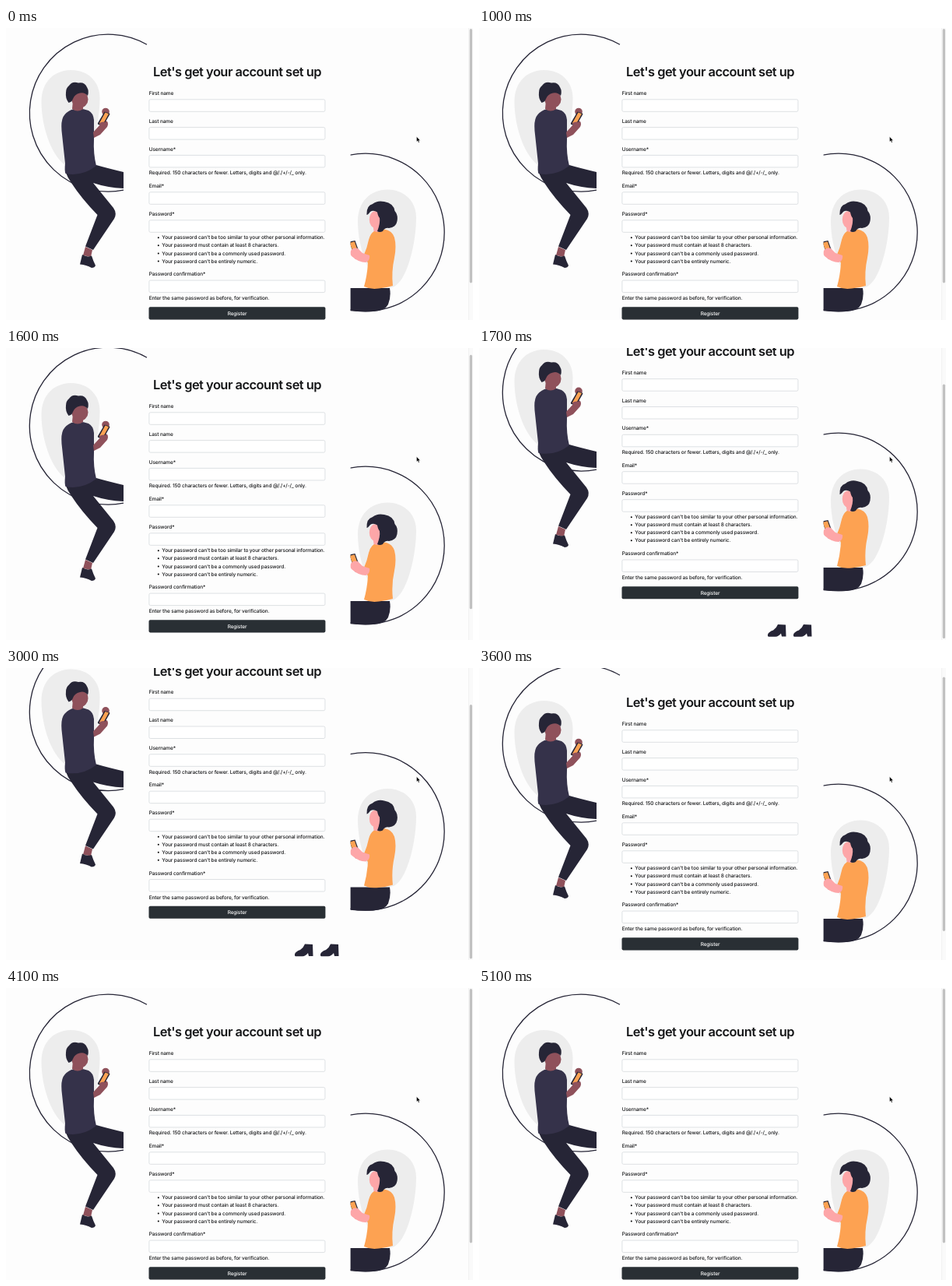
Recreate the animation shown at these times as an HTML page. Size 600 by 375 pixels, loop 5.3 s.

```html
<!DOCTYPE html>
<html lang="en">
<head>
<meta charset="utf-8">
<title>Account set up</title>
<style>
html, body { margin: 0; width: 100%; height: 100%; overflow: hidden; background: #fdfdfd; }
svg { display: block; width: 100vw; height: 100vh; }
text { font: 500 6.5px Inter, "Open Sans", sans-serif; letter-spacing: -.11px; fill: #141517; text-rendering: geometricPrecision; }
.title { font-size: 16.4px; font-weight: 600; letter-spacing: -.49px; text-anchor: middle; }
.button { fill: #fff; text-anchor: middle; }
.field { fill: #fff; stroke: #d0d4d8; stroke-width: .7; }
.ring { fill: none; stroke: #262536; stroke-width: 1.3; }
.dark { fill: #262536; }
.coat { fill: #35324a; }
.brown { fill: #8f515b; }
.pink { fill: #fda6a8; }
.orange { fill: #fda252; }
.egg { fill: #ededed; }
</style>
</head>
<body>
<svg viewBox="0 0 600 375">
  <defs>
    <clipPath id="right"><rect x="442.600" y="150" width="130" height="230"/></clipPath>
    <path id="egg" d="M38 0C60 0 75 15 75 36C75 70 62 124 42 126C20 126 0 82 0 40C0 16 16 0 38 0Z"/>
    <path id="shoe" class="dark" d="M0 13Q1 9.500 7 7.500Q11 5 13 0L23 .5L23.500 15.500H18L17 11.500Q14 15.500 10 15.800H1Q-.5 15.500 0 13Z"/>
  </defs>
  <g id="page">
    <!-- man -->
    <use href="#egg" class="egg" x="45.500" y="54"/>
    <path class="ring" d="M181 21.200A101 101 0 1 0 151 208.200"/>
    <path class="dark" d="M77 186L116 176Q130 180 151 185V206Q130 205 112 199L138 231Q143 238 139 245L112 285L102 280.500L117.500 240Q97 219 84 199Q79 192 77 186Z"/>
    <path class="brown" d="M102 281L111 285L109 294L99 292Z"/>
    <path class="dark" d="M98 291Q104 295 110 292.500Q112 299 115 305Q114 308 110 308Q103 304 95 303.500Z"/>
    <path class="coat" d="M84 105Q95 102 106 106Q112 109 113 118L113 143Q112 161 116 177Q98 191 76.500 187Q75 183 76 174L71.500 132Q70.500 120 73.500 114Q77 108 84 105Z"/>
    <path class="brown" d="M112 134L121 124Q124 117 130 120Q132 123 130 127L121 137L113 141Z"/>
    <circle class="brown" cx="128" cy="107.500" r="4.800"/>
    <path class="dark" d="M126.500 107.500L132.700 109.500Q134 110 133 111.500L125 125.500L118.500 124Q117.500 123.500 118 122Z"/>
    <path class="orange" d="M127.500 108.600L132 110.200L124.200 124.300L119.600 122.800Z"/>
    <path class="brown" d="M120 122Q125 119 130 122L128 127L122 128Z"/>
    <path class="brown" d="M86 93L99 96V104Q92 109 85 104Z"/>
    <ellipse class="brown" cx="95" cy="91.500" rx="10.500" ry="11"/>
    <path class="dark" d="M80.500 96Q76 90 77 83Q77 77 81 74Q85 68 93 70.500Q101 69 104 76Q107 81 105 87Q101 82 95 83.500Q88 85 86 91Q85 94 83 95Z"/>

    <!-- woman -->
    <use href="#egg" class="egg" x="452" y="207.500"/>
    <g clip-path="url(#right)">
      <circle class="ring" cx="461.900" cy="262.500" r="101.300"/>
      <path class="dark" d="M440 334H493Q495 345 491 355Q487 363 472 364Q456 365 440 363Z"/>
      <path class="pink" d="M471 250L484 254V264H473Z"/>
      <path class="orange" d="M473 261Q480 264 486 258.500Q496 260 499 269Q502 280 499 295Q495 313 497 331Q487 334 479 334.500Q468 336 460 332Q464 318 465 302L460 291Q464 282 466 272Q468 264 473 261Z"/>
      <path class="dark" d="M441 274.500L448.500 273L456 294L449 297Z"/>
      <path class="orange" d="M441.500 276L447.800 274.300L454.300 293L449.300 295Z"/>
      <path class="pink" d="M443 286Q446 281 452 283Q455 286 458 289L467 292Q468 299 462 301Q453 301 444 293Q441 290 443 286Z"/>
    </g>
    <ellipse class="pink" cx="474" cy="246" rx="7.200" ry="10.700"/>
    <path class="dark" d="M463.500 240Q463 228 471 226Q477 221 486 223Q498 225 499.500 235Q504 240 502.500 248Q501 256 492 257Q487 256 484 261Q480 263 477 261Q481 251 480 244Q478 242 477 236.500Q472 233.500 468 236Q465 240 463.500 240Z"/>
    <use href="#shoe" x="371" y="407"/>
    <use href="#shoe" x="404" y="407"/>

    <text class="title" x="297" y="62.300">Let's get your account set up</text>
    <g id="form"></g>
    <rect x="183.500" y="358.300" width="226.900" height="16.100" rx="1.800" fill="#292f34"/>
    <text class="button" x="297" y="368.800">Register</text>
  </g>
  <path d="M594.500 0V375" stroke="#ebebeb" stroke-width=".6"/>
  <rect x="595" width="5" height="375" fill="#fafafa"/>
  <rect id="thumb" x="595.700" y="1" width="3.300" height="326.500" rx="1.650" fill="#c1c1c1"/>
  <path d="M527.500 139.500V146L529 144.800L530 147.200L531.200 146.700L530.200 144.400H532.200Z" fill="#000" stroke="#fff" stroke-width=".4"/>
</svg>
<script>
const fields = [
  ["First name", 85.9], ["Last name", 121.7], ["Username*", 157.5],
  ["Email*", 204.9], ["Password*", 240.9], ["Password confirmation*", 318.2]
];
const hints = [
  ["Required. 150 characters or fewer. Letters, digits and @/./+/-/_ only.", 188.4],
  ["Enter the same password as before, for verification.", 349.3]
];
const rules = [
  "can't be too similar to your other personal information.",
  "must contain at least 8 characters.",
  "can't be a commonly used password.",
  "can't be entirely numeric."
];
const label = (s, x, y) => `<text x="${x}" y="${y}">${s}</text>`;
let form = "";
for (const [s, y] of fields)
  form += label(s, 183.7, y) +
    `<rect class="field" x="183.900" y="${y + 5.9}" width="226" height="15.500" rx="1.700"/>`;
for (const [s, y] of hints) form += label(s, 183.7, y);
rules.forEach((s, i) => {
  const y = 271.4 + i * 10.05;
  form += `<circle cx="195.800" cy="${y - 2.1}" r="1"/>` + label("Your password " + s, 200.3, y);
});
document.getElementById("form").innerHTML = form;

// [time, scroll offset], each held until the next
const END = 52.6;
const steps = [
  [0, 0], [1500, 1.5], [1600, 9], [1700, 52.1], [1800, END],
  [3500, 47], [3600, 12], [3700, 1.3], [3800, .7], [3900, .3], [4000, 0]
];
const page = document.getElementById("page");
const thumb = document.getElementById("thumb");

function draw(now) {
  const t = now % 5300;
  const y = steps.findLast(s => s[0] <= t)[1];
  page.setAttribute("transform", `translate(0 ${-y})`);
  thumb.setAttribute("y", 1 + y / END * 46);
  requestAnimationFrame(draw);
}
draw(0);
</script>
</body>
</html>
```
